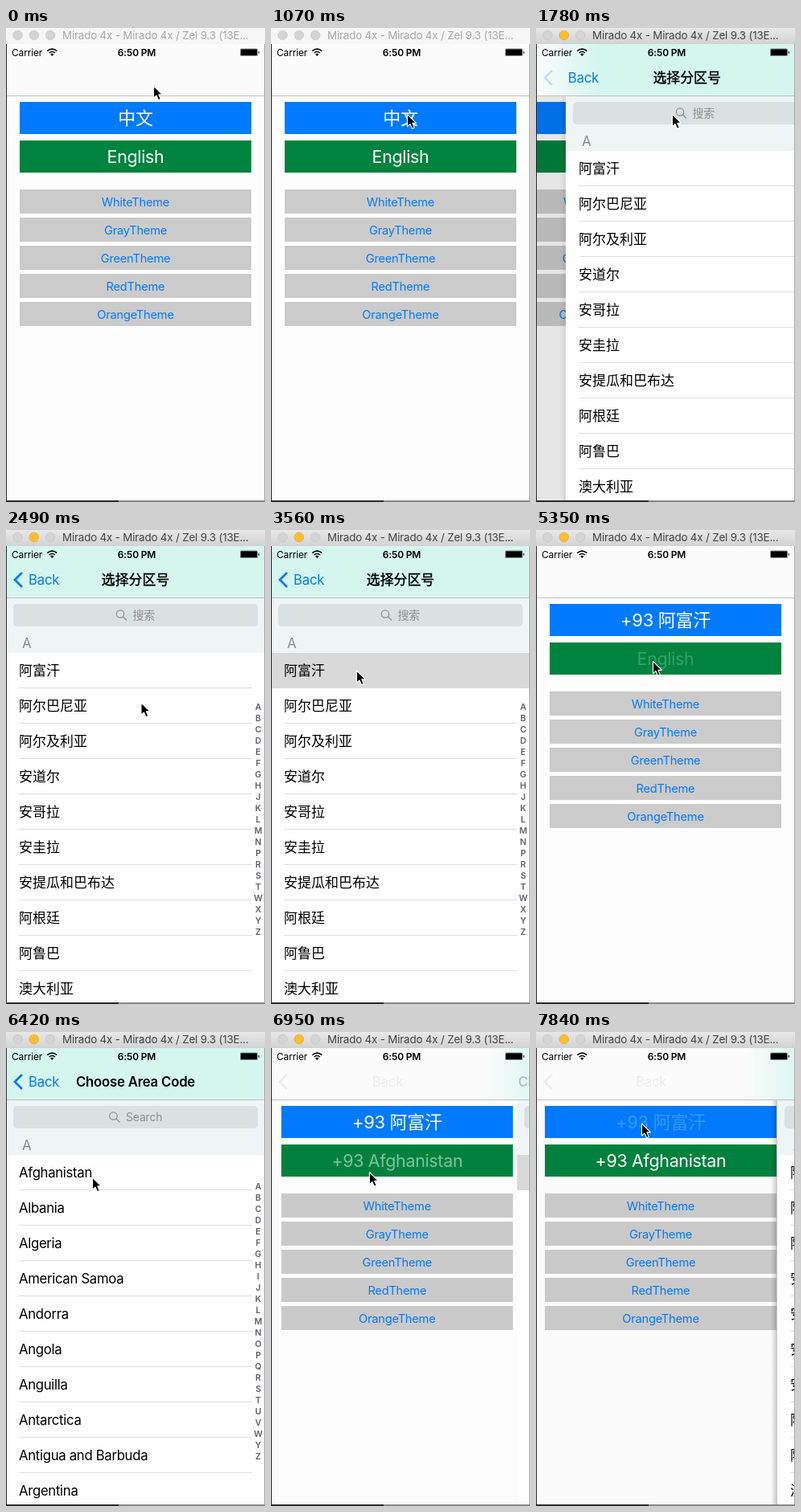
Animation of 322x590 px, one loop 8 s. Source, as an HTML page:

```html
<!DOCTYPE html>
<html lang="zh-CN">
<head>
<meta charset="utf-8">
<title>Area code picker</title>
<style>
html, body { margin: 0; width: 322px; height: 590px; overflow: hidden; background: #2b2b2b; }
svg { display: block; }
text {
  font-family: Inter, "Noto Sans CJK SC", "Noto Sans CJK", sans-serif;
  letter-spacing: -.014em;
  white-space: pre;
}
.zh { letter-spacing: 0; }
.en { letter-spacing: -.02em; }
</style>
</head>
<body>
<svg id="stage" width="322" height="590" viewBox="0 0 322 590">
  <defs>
    <clipPath id="screen"><rect x="1" y="20" width="320" height="568"/></clipPath>
    <linearGradient id="bar" x2="0" y2="1">
      <stop offset="0" stop-color="#e8e8e8"/><stop offset="1" stop-color="#d2d2d2"/>
    </linearGradient>
    <linearGradient id="shade">
      <stop offset="0" stop-opacity="0"/><stop offset="1" stop-opacity=".22"/>
    </linearGradient>
    <linearGradient id="mint" gradientUnits="userSpaceOnUse" x1="-40" x2="40">
      <stop offset="0" stop-color="#d5f6ee" stop-opacity="0"/><stop offset="1" stop-color="#d5f6ee"/>
    </linearGradient>
  </defs>
</svg>
<script>
const LOOP = 8000, TICKS = 45, WIDTH = 320;
const stage = document.getElementById('stage');

function set(el, attrs) {
  for (const key in attrs) el.setAttribute(key, attrs[key]);
}
function add(parent, tag, attrs, content) {
  const el = document.createElementNS('http://www.w3.org/2000/svg', tag);
  set(el, attrs);
  if (content) el.textContent = content;
  parent.append(el);
  return el;
}
const group = (parent, attrs = {}) => add(parent, 'g', attrs);
const rect = (parent, x, y, width, height, fill, more) =>
  add(parent, 'rect', { x, y, width, height, fill, ...more });
const label = (parent, content, x, y, size, fill, more) =>
  add(parent, 'text', { x, y, 'font-size': size, fill, ...more }, content);
const middle = { 'text-anchor': 'middle' };
const bold = { ...middle, 'font-weight': 600 };
const move = (el, x, y = 0) => el.setAttribute('transform', `translate(${x} ${y})`);
const show = (el, on) => el.setAttribute('display', on ? 'inline' : 'none');

// Desktop behind the window
rect(stage, 0, 0, 322, 590, '#2b2b2b');
rect(stage, 140, 588, 182, 2, '#85888e');
rect(stage, 321, 20, 1, 568, '#a8a8a8');

// Window title bar
const titleBar = rect(stage, 0, 0, 322, 20, '#f6f6f6');
const lights = [0, 1, 2].map(i => add(stage, 'circle', { cx: 14.5 + i * 20.3, cy: 9, r: 5.8, 'stroke-width': .6 }));
const title = label(stage, 'Mirado 4x - Mirado 4x / Zel 9.3 (13E...', 70, 14, 13.4);

const screen = group(stage, { 'clip-path': 'url(#screen)' });
rect(screen, 1, 20, 320, 568, '#fdfdfd');

// Main page
const main = group(screen);
rect(main, 17, 92, 288, 40, '#007aff');
rect(main, 17, 140, 288, 40, '#00833e');
const choices = {
  zh: { el: label(main, '', 161, 120, 22, '#fff', middle), before: '中文', after: '+93 阿富汗' },
  en: { el: label(main, '', 161, 168, 21.4, '#fff', middle), before: 'English', after: '+93 Afghanistan' }
};
['White', 'Gray', 'Green', 'Red', 'Orange'].forEach((name, i) => {
  const y = 201 + i * 35;
  rect(main, 17, y, 288, 30, '#cbcbcb');
  label(main, name + 'Theme', 161, y + 20.5, 14.6, '#007aff', middle);
});
const dim = rect(screen, 1, 85, 320, 503, '#000');

// List pages; the letter index is centred at y 364
function listPage(lang, search, searchX, names, letters) {
  const page = group(screen);
  const shadow = rect(page, -8, 85, 8, 503, 'url(#shade)');
  rect(page, 0, 85, 321, 503, '#fefefe');
  rect(page, 0, 85, 321, 68, '#eff5f5');
  rect(page, 9, 92, 304, 28, '#dae1e2', { rx: 5 });
  const icon = group(page, { fill: 'none', stroke: '#8e8e93', 'stroke-width': 1.2 });
  add(icon, 'circle', { cx: searchX - 15.5, cy: 104.5, r: 4.7 });
  add(icon, 'path', { d: `M${searchX - 12} 108l4.5 4.5` });
  label(page, search, searchX, 110.8, 14, '#8e8e93');
  label(page, 'A', 20, 147, 17, '#8a8d8e');
  const highlight = rect(page, 0, 153, 321, 44, '#d9d9d9');
  names.forEach((name, i) => {
    const y = 153 + i * 44;
    label(page, name, 16, y + 28, lang === 'zh' ? 17 : 16.8, '#000', { class: lang });
    rect(page, 16, y + 43, 290, 1, '#dedee0');
  });
  [...letters].forEach((letter, i) =>
    label(page, letter, 313.5, 364 + (i - (letters.length - 1) / 2) * 14, 10.6, '#5d5d6c', bold));
  return { page, shadow, highlight };
}
const lists = {
  zh: listPage('zh', '搜索', 157.5,
    ['阿富汗', '阿尔巴尼亚', '阿尔及利亚', '安道尔', '安哥拉', '安圭拉', '安提瓜和巴布达', '阿根廷', '阿鲁巴', '澳大利亚'],
    'ABCDEFGHJKLMNPRSTWXYZ'),
  en: listPage('en', 'Search', 149,
    ['Afghanistan', 'Albania', 'Algeria', 'American Samoa', 'Andorra', 'Angola', 'Anguilla', 'Antarctica', 'Antigua and Barbuda', 'Argentina'],
    'ABCDEFGHIJKLMNOPQRSTUVWYZ')
};

// Navigation bar
rect(screen, 1, 20, 320, 64, '#fbfbfb');
const navTint = rect(screen, -40, 20, 440, 64, 'url(#mint)');
rect(screen, 1, 84, 320, 1, '#bcc4c2');
const nav = group(screen);
const chevron = add(nav, 'path', { d: 'M20 53l-9 9 9 9', fill: 'none', 'stroke-width': 2.8 });
const back = label(nav, 'Back', 0, 68, 16.8);
const headings = {
  zh: label(nav, '选择分区号', 161, 68, 16.9, '#000', { ...middle, class: 'zh', stroke: '#000', 'stroke-width': .35 }),
  en: label(nav, 'Choose Area Code', 161, 68, 16.8, '#000', bold)
};

// Status bar
label(screen, 'Carrier', 7, 34.5, 12, '#000');
const wifi = group(screen, { fill: 'none', stroke: '#000', 'stroke-width': 1.6 });
add(wifi, 'path', { d: 'M51.3 28.6q6-5 12 0M53.6 31q3.7-3 7.4 0' });
add(wifi, 'path', { d: 'M57.3 35l-2.2-2.3q2.2-1.7 4.4 0z', fill: '#000', stroke: 'none' });
label(screen, '6:50 PM', 162.5, 34.5, 12, '#000', bold);
rect(screen, 291, 25.5, 22, 9.5, '#000', { rx: 1.6, opacity: .45 });
rect(screen, 292, 26.5, 20, 7.5, '#000', { rx: .8 });
rect(screen, 313.6, 28.8, 1.4, 3.2, '#000', { rx: .7, opacity: .7 });

const cursor = add(stage, 'path', {
  d: 'M0 0V15.2L3.5 12 6 17.8 8.8 16.6 6.3 10.9H11Z',
  fill: '#000', stroke: '#fff', 'stroke-width': 1.1, 'stroke-linejoin': 'round'
});

// Visits to a list page, in ticks: a button is tapped, later a row is picked
const PUSH_DELAY = .15;
const visits = [
  { lang: 'zh', tap: 8.82, pick: 20 },
  { lang: 'en', tap: 29.99, pick: 38 },
  { lang: 'zh', tap: 43.82, pick: Infinity }
];

// Curved pointer moves between rests
const home = { x: 183.5, y: 72 };
const strokes = [
  { from: 2, to: 6, bend: [272, 85], end: [169.5, 107.5] },
  { from: 11, to: 14, bend: [172, 150], end: [168, 215] },
  { from: 14, to: 18, bend: [23, 325], end: [106.5, 175] },
  { from: 22, to: 26, bend: [193, 173], end: [145.5, 163.5] },
  { from: 32, to: 36, bend: [107.5, 181], end: [107.5, 181] },
  { from: 38, to: 41, bend: [135, 183], end: [131.5, 114] }
];

const clamp = v => Math.min(1, Math.max(0, v));
const bezier = (a, b, c, u) => (1 - u) ** 2 * a + 2 * u * (1 - u) * b + u * u * c;
const lastVisit = (tick, lang) =>
  visits.findLast(v => v.tap <= tick && (!lang || v.lang === lang));

function pointer(tick) {
  let { x, y } = home;
  for (const { from, to, bend, end } of strokes) {
    const u = clamp((tick - from) / (to - from));
    x = bezier(x, bend[0], end[0], u);
    y = bezier(y, bend[1], end[1], u);
  }
  return [x, y];
}

// Left edge of the list page: decays in on a push, settles out on a pop
function pageLeft(visit, tick) {
  if (!visit) return WIDTH;
  const { tap, pick } = visit;
  const x = tick < pick
    ? WIDTH * Math.exp(-2.1 * Math.max(0, tick - tap - PUSH_DELAY))
    : WIDTH * (1 - Math.exp(-3.13 * (tick - pick)));
  return x > 319.9 ? WIDTH : Math.round(x);
}

function drawWindow(active) {
  titleBar.setAttribute('fill', active ? 'url(#bar)' : '#f6f6f6');
  title.setAttribute('fill', active ? '#444' : '#a8a8a8');
  lights.forEach((light, i) => set(light, active && i === 1
    ? { fill: '#fdbd2f', stroke: '#dfa023' }
    : { fill: '#d4d4d4', stroke: '#c2c2c2' }));
}

function drawChoice(lang, tick) {
  const { el, before, after } = choices[lang];
  const visit = lastVisit(tick, lang);
  const picked = visits.some(v => v.lang === lang && v.pick <= tick);
  el.textContent = picked ? after : before;
  const fade = !visit ? 1 : tick < visit.pick ? .22 : clamp((tick - visit.pick) / 2);
  el.setAttribute('opacity', fade);
}

function drawNav(x, lang) {
  const early = x > 200;
  const color = early ? '#000' : '#007aff';
  show(nav, x < WIDTH);
  show(navTint, x < WIDTH);
  move(navTint, x || -60);
  set(chevron, { stroke: color, opacity: early ? .06 : x > 30 ? .22 : 1 });
  set(back, { x: 28 + x * .32, fill: color, opacity: early ? .05 : 1 });
  for (const key in headings) {
    show(headings[key], key === lang);
    set(headings[key], { x: 161 + x * .72, opacity: early ? .2 : 1 });
  }
}

function draw(t) {
  const tick = Math.floor(t / LOOP * TICKS);
  const visit = lastVisit(tick);
  const lang = visit?.lang;
  const x = pageLeft(visit, tick);
  const picked = tick >= visit?.pick;

  drawWindow(!!visit);
  move(main, -.3 * (WIDTH - x));
  dim.setAttribute('opacity', .1 * (1 - x / WIDTH));
  for (const key in lists) {
    const { page, shadow, highlight } = lists[key];
    show(page, key === lang && x < WIDTH);
    move(page, x);
    set(shadow, { opacity: picked ? 0 : .25 + .75 * x / WIDTH });
    show(highlight, picked);
    drawChoice(key, tick);
  }
  drawNav(x, lang);
  move(cursor, ...pointer(tick));
}

const start = performance.now();
function frame() {
  draw((performance.now() - start) % LOOP);
  requestAnimationFrame(frame);
}
frame();
</script>
</body>
</html>
```
